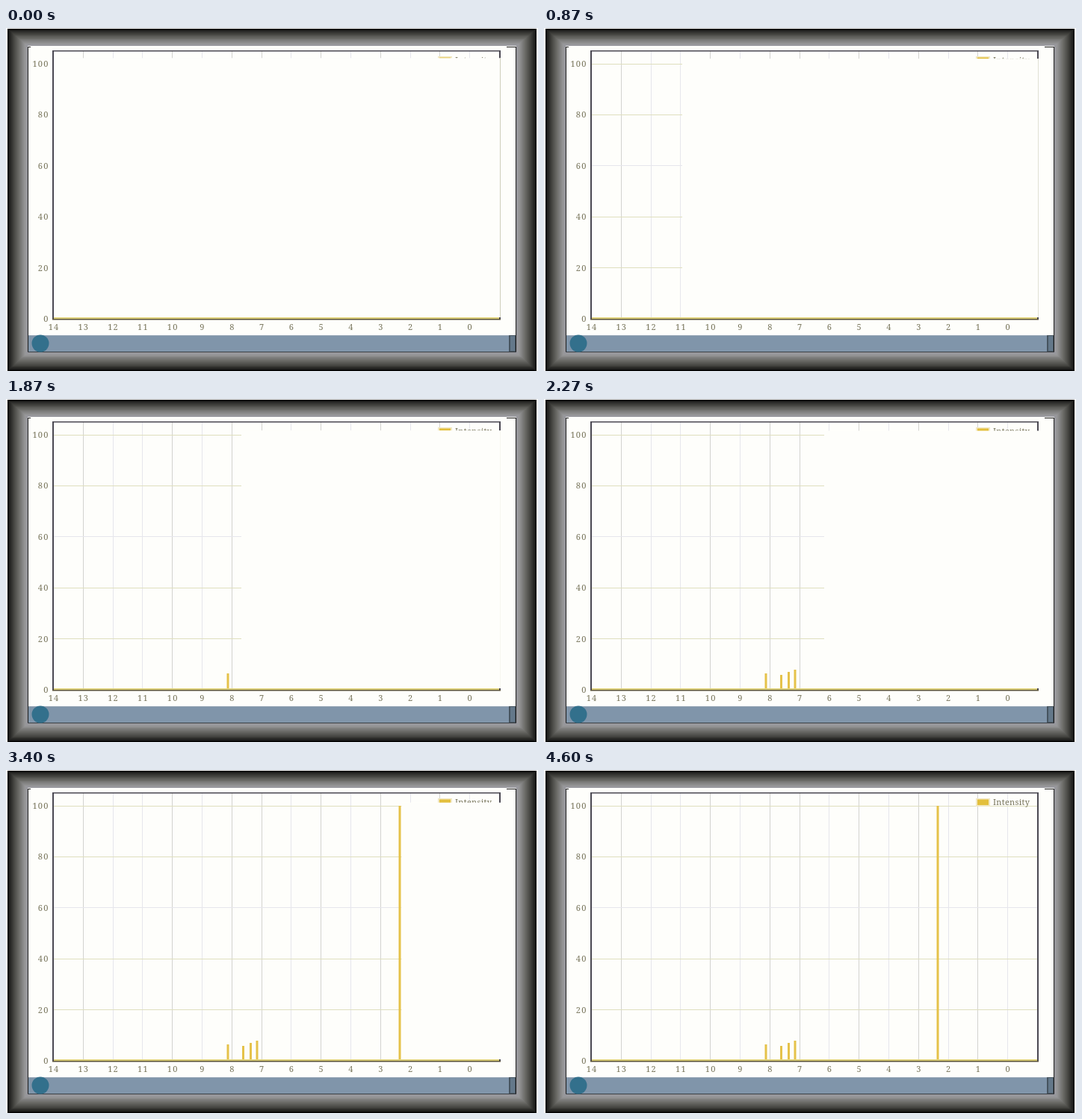
Animation, 712 px wide and 460 px high, one loop 4990 ms. Source, as an HTML page with a canvas:

```html
<!DOCTYPE html>
<html lang="en">
<head>
<meta charset="utf-8">
<title>Intensity chart</title>
<style>
  html, body { margin: 0; width: 100%; height: 100%; overflow: hidden; background: #fff; }
  canvas { display: block; }
</style>
</head>
<body>
<canvas id="stage" width="712" height="460"></canvas>
<script>
const ctx = document.getElementById('stage').getContext('2d');
const LOOP = 4990, FPS = 15;
const PAPER = '#fefefb', DARK = '#4a4852', GOLD = '#e5c24a', INK = '#77745a';

const plot = { left: 63, right: 661, top: 31, base: 390 };
const xOf = ppm => plot.left + 39.8 * (14 - ppm);
const yOf = value => plot.base - 3.42 * value;

// Peaks: x position and top edge
const peaks = [[297, 368], [317.5, 370], [327.5, 366], [336, 363], [527, 48]];

// Reveal edge: step and x position
const edge = [[0, 64], [13, 185], [22, 255], [34, 375], [44, 461], [57, 588], [66, 663]];

const bevel = [
  [0, [0, 0, 0]], [0.06, [28, 28, 26]], [0.3, [70, 70, 66]],
  [0.55, [108, 108, 104]], [0.85, [150, 150, 152]], [1, [152, 152, 160]]
];

// Grid line colours: strong, olive, pale
const tints = { s: '#d3d3d0', o: '#dfdfbe', p: '#e6e6ec' };
const columns = 'sppspsspspspsp';
const rows = 'oopoo';

function lerpPoints(points, at) {
  let i = 1;
  while (i < points.length - 1 && at > points[i][0]) i++;
  const [a, va] = points[i - 1], [b, vb] = points[i];
  const u = Math.max(0, Math.min(1, (at - a) / (b - a)));
  const mix = (p, q) => p + (q - p) * u;
  return Array.isArray(va) ? va.map((v, k) => mix(v, vb[k])) : mix(va, vb);
}

function box(color, x, y, w, h) {
  ctx.fillStyle = color;
  ctx.fillRect(x, y, w, h);
}

function label(text, x, y, align, size, spacing) {
  ctx.font = size + 'px "Noto Serif", serif';
  ctx.letterSpacing = spacing + 'px';
  ctx.textAlign = align;
  ctx.textBaseline = 'alphabetic';
  ctx.fillStyle = INK;
  ctx.fillText(text, x, y);
}

function drawFrame() {
  box('#fff', 0, 0, 712, 460);
  const bands = 27;
  for (let i = 0; i < bands; i++) {
    const u = i / bands;
    const l = Math.round(2 + 27 * u), t = Math.round(1 + 23 * u);
    const r = Math.round(710 - 27 * u), b = Math.round(460 - 25 * u);
    const rgb = lerpPoints(bevel, u).map(Math.round);
    box(`rgb(${rgb})`, l, t, r - l, b - t);
  }
  box(PAPER, 29, 24, 654, 411);
  box('#1c1c1c', 29, 25, 1, 410);
  box('#1c1c1c', 682, 25, 1, 410);
  box('#1c1c1c', 29, 25, 4, 1);
  box('#1c1c1c', 670, 25, 13, 1);
}

function drawTaskbar() {
  box('#8095aa', 30, 412, 643, 22);
  box('#94a4b4', 30, 412, 643, 1);
  box('#46545f', 673, 412, 9, 22);
  box('#64788a', 675, 413, 6, 20);
  box('#3c4044', 29, 434, 654, 1);
  ctx.fillStyle = '#33708c';
  ctx.beginPath();
  ctx.arc(46, 423, 11.5, 0, 2 * Math.PI);
  ctx.fill();
}

function drawGrid() {
  for (let i = 0; i < columns.length; i++) {
    box(tints[columns[i]], Math.round(xOf(13 - i)), plot.top, 1, plot.base - plot.top);
  }
  for (let i = 0; i < rows.length; i++) {
    box(tints[rows[i]], plot.left, Math.floor(yOf(20 * (5 - i))), plot.right - plot.left, 1);
  }
}

function drawAxes() {
  box(DARK, 62, 30, 600, 1.5);
  box(DARK, 62, 30, 2, 361);
  box(DARK, 660, 30, 2, 361);
}

function drawLegend() {
  box('#f1e8c4', 578, 38, 19, 11);
  box('#e3bf3c', 580, 39.5, 15, 7.5);
  label('Intensity', 601, 47, 'left', 11, 0.3);
}

function drawLabels() {
  for (let v = 0; v <= 100; v += 20) label(v, 57.5, yOf(v) + 4, 'right', 11, 1.2);
  for (let p = 0; p <= 14; p++) label(p, xOf(p) + 1, 405, 'center', 11, 1.2);
}

function drawCover(step) {
  const x = lerpPoints(edge, step);
  if (x >= 663) return;
  const top = 40.3 + step * 0.067;
  box(PAPER, x, top, 663 - x, 388 - top);
  // Faint right rule that dissolves as the cover recedes
  ctx.globalAlpha = Math.max(0, 1 - step / 34);
  box('#cfcfbc', 661, top, 1, 388 - top);
  ctx.globalAlpha = 1;
}

function drawBaseline() {
  box('#ddd07a', 64, 388, 596, 2);
  box('#5a5238', 62, 390, 600, 1.5);
}

function draw(time) {
  const step = Math.floor(time * FPS / 1000 + 0.1);
  drawFrame();
  drawTaskbar();
  drawGrid();
  drawAxes();
  drawLegend();
  for (const [x, y] of peaks) box(GOLD, x - 1.5, y, 3, plot.base - y);
  drawCover(step);
  drawBaseline();
  drawLabels();
}

const start = performance.now();
function tick() {
  draw((performance.now() - start) % LOOP);
  requestAnimationFrame(tick);
}
tick();
</script>
</body>
</html>
```
